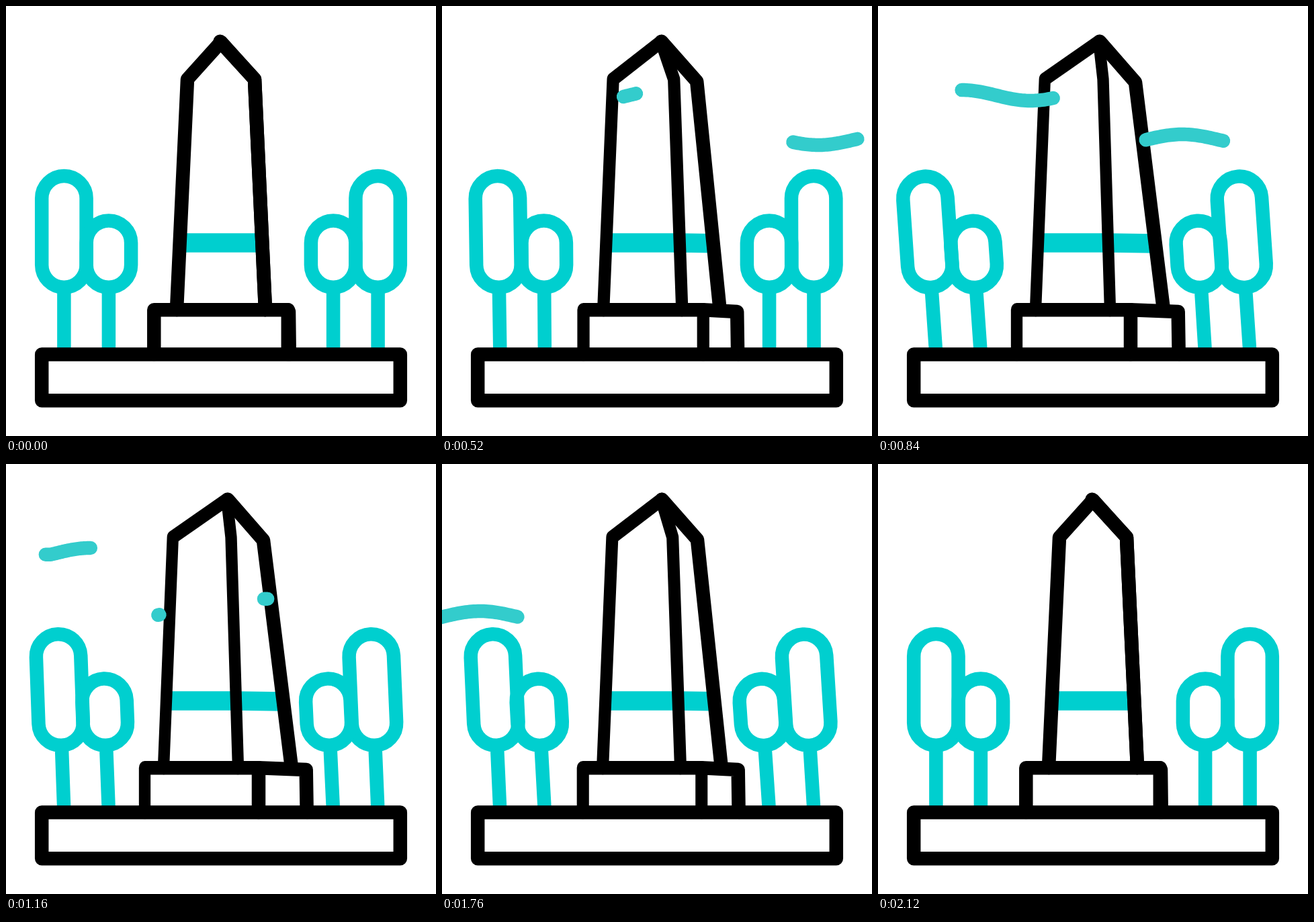
These frames come from a looping animation (640x640 px, 2960 ms). An HTML page with a canvas:

```html
<!DOCTYPE html>
<html lang="en">
<head>
<meta charset="utf-8">
<title>Obelisk in the wind</title>
<style>
html, body { margin: 0; height: 100%; overflow: hidden; background: #fff; }
canvas { display: block; width: 640px; height: 640px; }
</style>
</head>
<body>
<canvas id="stage" width="640" height="640"></canvas>
<script>
const ctx = document.getElementById('stage').getContext('2d');
const LOOP = 2960, STEP = 40, PEN = 20.5;
const BLACK = '#000', TEAL = '#00cfcf', WIND = '#33cccc';

const progress = (t, a, b) => Math.min(1, Math.max(0, (t - a) / (b - a)));
const smooth = x => x * x * (3 - 2 * x);
const ease = (t, a, b) => smooth(progress(t, a, b));
const lerp = (a, b, k) => a + (b - a) * k;

// Strokes a polyline; penX squeezes the pen horizontally, not the points.
function line(points, color, width = PEN, penX = 1, closed = false) {
  ctx.beginPath();
  points.forEach(([x, y]) => ctx.lineTo(x, y));
  if (closed) ctx.closePath();
  ctx.save();
  ctx.scale(penX, 1);
  ctx.strokeStyle = color;
  ctx.lineWidth = width;
  ctx.stroke();
  ctx.restore();
}

function sway(t) {
  const keys = [0, 4, 2, 4, 0];
  const k = Math.min(3, Math.max(0, Math.floor((t - 400) / 400)));
  const start = 400 + k * 400;
  return lerp(keys[k], keys[k + 1], ease(t, start, start + 400));
}

function tree(x, top, t) {
  const r = 33.2, bottom = 418.7;
  ctx.save();
  ctx.translate(x, 518);
  ctx.rotate(-sway(t) * Math.PI / 180);
  ctx.translate(0, -518);
  ctx.beginPath();
  ctx.arc(0, top + r, r, Math.PI, 0);
  ctx.arc(0, bottom - r, r, 0, Math.PI);
  ctx.closePath();
  ctx.moveTo(0, bottom);
  ctx.lineTo(0, 518);
  ctx.strokeStyle = TEAL;
  ctx.lineWidth = PEN;
  ctx.stroke();
  ctx.restore();
}

function monument(p) {
  const mix = (x0, x1, y0, y1 = y0) => [lerp(x0, x1, p), lerp(y0, y1, p)];
  const squeeze = lerp(1, 0.845, p);

  ctx.lineCap = 'butt';
  line([mix(258.6, 239, 352.5), mix(381, 342, 352.5), mix(381, 412, 352.5, 353.5)], TEAL, 28.5);
  ctx.lineCap = 'round';

  line([mix(318.5, 330, 52.8), mix(370, 383, 109, 113.5), mix(386, 425, 452)], BLACK);
  line([mix(254, 234.5, 452), mix(270, 248.3, 109), mix(320, 328.7, 53.5, 53),
        mix(370, 335, 109), mix(386, 345.5, 452)], BLACK, PEN, squeeze);

  const corner = mix(419.8, 376, 452.3);
  const foot = [corner[0], 518];
  line([mix(220.3, 206.5, 518), mix(220.3, 206.5, 452.3), corner, foot], BLACK, PEN, squeeze);
  line([corner, mix(421, 446.7, 455), mix(421.8, 447.7, 518)], BLACK);
  if (p > 0) line([corner, foot], BLACK, PEN * p);
}

// A gust runs leftwards along one wave; head and tail are time spans.
function gust(t, startX, dy, scale, head, tail) {
  const from = 241 * smooth(progress(t, ...tail) ** 1.2);
  const to = 241 * ease(t, ...head);
  if (to - from < 0.1 || from > 240) return;
  const points = [];
  for (let i = 0; i <= 40; i++) {
    const d = lerp(from, to, i / 40);
    const phase = Math.PI * (Math.max(392, 625 - d) - 560) / 107;
    points.push([startX - d * scale, 199 + dy + 8 * Math.cos(phase)]);
  }
  line(points, WIND);
}

function draw(t) {
  ctx.fillStyle = '#fff';
  ctx.fillRect(0, 0, 640, 640);
  ctx.lineJoin = 'round';
  ctx.lineCap = 'butt';

  tree(86.4, 253, t);
  tree(152.9, 319.4, t - 40);
  tree(553.6, 253, t - 80);
  tree(487.1, 319.4, t - 120);

  monument(ease(t, 160, 720) - ease(t, 1595, 2120));
  line([[53.2, 518.4], [586.8, 518.4], [586.8, 587.2], [53.2, 587.2]], BLACK, PEN, 1, true);

  gust(t, 625, 0, 1, [160, 960], [400, 1220]);
  gust(t, 289, -66, 0.955, [400, 1080], [620, 1400]);
  gust(t, 228.5, 28, 1, [1120, 1830], [1320, 2120]);
}

const began = performance.now();
function tick() {
  const t = (performance.now() - began) % LOOP;
  draw(Math.floor(t / STEP) * STEP);
  requestAnimationFrame(tick);
}
tick();
</script>
</body>
</html>
```
